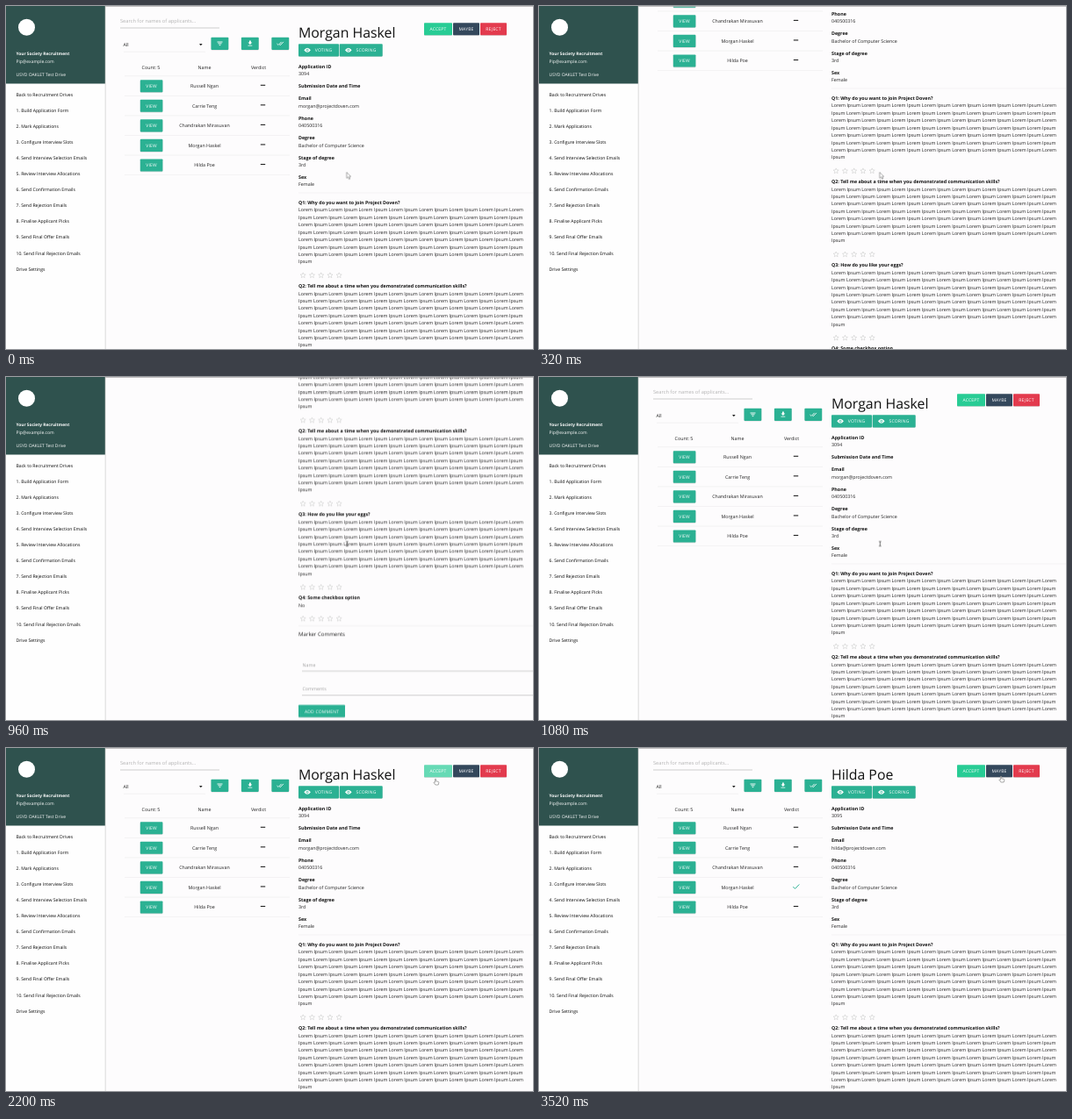
Animation, 600 px wide and 391 px high, one loop 3560 ms. Source, as an HTML page:

```html
<!DOCTYPE html>
<html lang="en">
<head>
<meta charset="utf-8">
<title>Recruitment drive</title>
<style>
  html, body { margin: 0; width: 100%; height: 100%; overflow: hidden; background: #fdfcfd; }
  svg { display: block; width: 600px; height: 391px; }
  text { font: 5.34px "Open Sans", "Noto Sans", sans-serif; fill: #222; text-rendering: geometricPrecision; white-space: pre; }
  .b { font-weight: 700; font-size: 5.34px; fill: #111; }
  .side { font-size: 5.14px; font-weight: 500; fill: #0c0c0c; }
  .head { font-size: 5px; fill: #fff; }
  .bold { font-weight: 700; font-size: 4.8px; }
  .h1 { font-size: 15.85px; fill: #111; }
  .h2 { font-size: 6.1px; }
  .hint { fill: #a3a3a3; }
  .search { font-size: 5.7px; fill: #b4b4b4; }
  .mid { text-anchor: middle; }
  .btn { font-size: 5px; fill: #fff; letter-spacing: .2px; }
  .rule { stroke: #f0eeef; stroke-width: .7; }
  .field { stroke: #b0b0b0; stroke-width: .6; }
  .star { fill: #fff; stroke: #c8c8c8; stroke-width: .55; }
  .icon { fill: none; stroke: #fff; stroke-width: .9; }
  .cur path { fill: #fff; stroke: #666; stroke-width: .55; stroke-linejoin: round; }
</style>
</head>
<body>
<svg id="stage" viewBox="0 0 600 391"></svg>
<script>
const LOOP = 3560, STEP = 40;
const TEAL = '#2bb193', GREEN = '#28cc95', GREEN_HOVER = '#66dab5', NAVY = '#34485c', RED = '#e33b4e';
const BTN_H = 14.1;

// Drawing helpers: y is the middle of the text line
const text = (x, y, s, cls = '') => `<text x="${x}" y="${y + 2}" class="${cls}">${s}</text>`;
const line = (x1, x2, y, cls = 'rule') => `<path d="M${x1} ${y}H${x2}" class="${cls}"/>`;
const box = (x, y, w, fill, id = '') =>
  `<rect x="${x}" y="${y + .7}" width="${w}" height="${BTN_H}" rx="1" fill="#000" opacity=".14"/>` +
  `<rect id="${id}" x="${x}" y="${y}" width="${w}" height="${BTN_H}" rx=".8" fill="${fill}"/>`;
const button = (x, y, w, fill, label, id) =>
  box(x, y, w, fill, id) + text(x + w / 2, y + BTN_H / 2, label, 'btn mid');
const icon = (x, y, d) => `<path class="icon" transform="translate(${x} ${y})" d="${d}"/>`;

const eyeButton = (x, w, label) => box(x, 43.3, w, TEAL) +
  `<path d="M${x + 6.3} 50.3q3.8 -5 7.6 0q-3.8 5 -7.6 0z" fill="#fff"/>` +
  `<circle cx="${x + 10.1}" cy="50.3" r="1.1" fill="#fff" stroke="${TEAL}" stroke-width=".7"/>` +
  text(x + 18.8, 50.3, label, 'btn');

const starPath = Array.from({ length: 10 }, (_, i) => {
  const r = i % 2 ? 1.4 : 3.2, a = i * Math.PI / 5;
  return (r * Math.sin(a)).toFixed(2) + ' ' + (-r * Math.cos(a)).toFixed(2);
}).join('L');
const stars = y => [0, 1, 2, 3, 4].map(i =>
  `<path class="star" transform="translate(${338.2 + i * 10.25} ${y})" d="M${starPath}z"/>`).join('');

// 53 word pairs wrapped at 15 words a line
const words = Array.from({ length: 106 }, (_, i) => i % 2 ? 'Ipsum' : 'Lorem');
function question(y, title) {
  let out = text(333, y, title, 'b');
  for (let i = 0; i < 8; i++)
    out += text(333, y + 8.5 + i * 8.42, words.slice(i * 15, i * 15 + 15).join(' '));
  return out + stars(y + 83.2);
}

const people = ['Russell Ngan', 'Carrie Teng', 'Chandrakan Mirasuvan', 'Morgan Haskel', 'Hilda Poe'];
const dash = y => `<path d="M289.8 ${y}h5.4" stroke="#222" stroke-width="1.1"/>`;

function table() {
  let out = text(165, 70.2, 'Count: 5', 'mid') + text(226, 70.2, 'Name', 'mid') + text(287.5, 70.2, 'Verdict', 'mid');
  out += line(135, 323, 79.7);
  people.forEach((name, i) => {
    const y = 91.2 + i * 22.55;
    out += button(152.8, y - 7, 25.6, TEAL, 'VIEW') + text(226, y, name, 'mid') + line(135, 323, y + 11.2);
    out += i === 3 ? `<g id="undecided">${dash(y - .9)}</g>` : dash(y - .9);
  });
  return out + `<path id="accepted" d="M289.3 158.2l2.2 2.2 4.8-4.9" fill="none" stroke="${TEAL}" stroke-width="1"/>`;
}

const tools = line(130, 243, 25, 'field') + text(130, 16.5, 'Search for names of applicants...', 'search') +
  text(133.5, 44, 'All') + '<path d="M220 43h3.6l-1.8 2.3z" fill="#222"/>' + line(134, 227, 52.3) +
  [233.5, 267.9, 302.4].map(x => box(x, 35.8, 19.8, TEAL)).join('') +
  icon(243.5, 42.8, 'M-3 -1.8H3M-2 0H2M-.8 1.8H.8') +
  '<path d="M277 39.6h1.8v2h1.5l-2.4 2.4-2.4-2.4h1.5zM275.5 44.7h4.8v.9h-4.8z" fill="#fff"/>' +
  icon(312.3, 42.8, 'M-3.8 .2l1.7 1.7M-1.7 .2l1.6 1.7 3.7-3.8M-1 .6l2.3-2.5');

const profile = (id, name, no, mail) => `<g id="${id}">` + text(333, 33.5, name, 'h1') +
  text(333, 77.2, no) + text(333, 113.5, mail) + '</g>';

const details = [
  [69, 'Application ID'], [91.3, 'Submission Date and Time'], [105.3, 'Email'],
  [127.8, 'Phone', '040500316'], [150.3, 'Degree', 'Bachelor of Computer Science'],
  [172.7, 'Stage of degree', '3rd'], [195, 'Sex', 'Female']
].map(([y, label, value]) => text(333, y, label, 'b') + (value ? text(333, y + 8.4, value) : '')).join('');

const page = tools + table() +
  profile('first', people[3], '3094', 'morgan@projectdoven.com') +
  profile('second', people[4], '3095', 'hilda@projectdoven.com') +
  button(476, 19.2, 32, GREEN, 'ACCEPT', 'accept') +
  button(509, 19.2, 30, NAVY, 'MAYBE') +
  button(540, 19.2, 30, RED, 'REJECT') +
  eyeButton(333, 46, 'VOTING') + eyeButton(379.7, 49, 'SCORING') + details + line(333, 600, 213) +
  question(223.9, 'Q1: Why do you want to join Project Doven?') +
  question(319, 'Q2: Tell me about a time when you demonstrated communication skills?') +
  question(414.2, 'Q3: How do you like your eggs?') +
  text(333, 509.2, 'Q4: Some checkbox option', 'b') + text(333, 517.7, 'No') + stars(533.3) +
  line(333, 600, 541.3) + text(333, 551, 'Marker Comments', 'h2') +
  text(337.5, 585.6, 'Name', 'hint') + line(337, 600, 593, 'field') +
  text(337.5, 613, 'Comments', 'hint') + line(337, 600, 620.5, 'field') +
  button(333, 631.5, 53, TEAL, 'ADD COMMENT') +
  button(537.7, 665.4, 65, RED, 'DELETE APPLICATION');

const menu = ['Back to Recruitment Drives', '1. Build Application Form', '2. Mark Applications',
  '3. Configure Interview Slots', '4. Send Interview Selection Emails', '5. Review Interview Allocations',
  '6. Send Confirmation Emails', '7. Send Rejection Emails', '8. Finalise Applicant Picks',
  '9. Send Final Offer Emails', '10. Send Final Rejection Emails', 'Drive Settings'];

const sidebar = '<rect width="113" height="391" fill="#fefefe"/><rect width="113" height="88.5" fill="#2f524e"/>' +
  '<path d="M113.2 0V391" stroke="#d2d2d2" stroke-width=".8"/>' +
  '<circle cx="23.5" cy="24.3" r="9.5" fill="#fff"/>' +
  text(11.5, 54.2, 'Your Society Recruitment', 'head bold') +
  text(11.5, 62.9, 'Pip@example.com', 'head') + text(11.5, 78, 'USYD OAKLET Test Drive', 'head') +
  menu.map((s, i) => text(11.5, 100.7 + i * 18.08, s, 'side')).join('');

const cursor = '<g id="cursor" class="cur">' +
  '<path id="arrow" d="M0 0V6.8L1.6 5.4 2.8 8 3.9 7.5 2.8 5H4.8z"/>' +
  '<g id="beam"><path d="M-.9 -1.9H1.9M.5 -1.9V3.1M-.9 3.1H1.9" style="fill:none;stroke:#444;stroke-width:.7"/></g>' +
  '<g id="hand"><path d="M-.6 .5Q0 -.5 .6 .5V2.9L3.2 3.4Q3.9 3.7 3.8 4.4L3.2 7H-.1L-2 4.4Q-1.9 3.5 -.6 4.3z"/></g></g>';

document.getElementById('stage').innerHTML = `<g id="page">${page}</g>` +
  '<rect x="113" width="487" height=".8" fill="#b2b0b1"/>' + sidebar + cursor;

// Motion: keys are [ms, value]; moves advance every STEP, jumps hold until the next key
function animate(id, prop, keys, jump = false) {
  const all = [...keys, [LOOP, keys[keys.length - 1][1]]];
  const frames = all.map(([ms, value], i) => {
    const next = all[i + 1];
    const n = next && !jump ? Math.max(1, Math.round((next[0] - ms) / STEP)) : 1;
    return { offset: ms / LOOP, [prop]: value, easing: `steps(${n}, end)` };
  });
  document.getElementById(id).animate(frames, { duration: LOOP, iterations: Infinity });
}
const move = (id, keys) => animate(id, 'transform', keys.map(([ms, x, y]) => [ms, `translate(${x}px, ${y}px)`]));
const show = (id, ...keys) => animate(id, 'opacity', keys, true);

move('page', [[0, 0, 0], [200, 0, 0], [240, 0, -18], [280, 0, -58], [320, 0, -119], [360, 0, -220], [400, 0, -302],
  [920, 0, -302], [960, 0, -257.7], [1000, 0, -150], [1040, 0, -50], [1080, 0, 0]]);
move('cursor', [[0, 387.8, 189.5], [1400, 387.8, 189.5], [1560, 412, 150], [1760, 470, 62], [1880, 489, 35],
  [2280, 489, 35], [2520, 556, 34], [2720, 490, 33], [3120, 490, 33], [3320, 552, 32], [3400, 551, 32], [3520, 526, 32]]);

show('arrow', [0, 1], [960, 0], [1400, 1], [1880, 0]);
show('beam', [0, 0], [960, 1], [1400, 0]);
show('hand', [0, 0], [1880, 1]);
animate('accept', 'fill', [[0, GREEN], [1880, GREEN_HOVER], [2360, GREEN], [2680, GREEN_HOVER], [3200, GREEN]], true);

const CLICK = 2960;
for (const id of ['first', 'undecided']) show(id, [0, 1], [CLICK, 0]);
for (const id of ['second', 'accepted']) show(id, [0, 0], [CLICK, 1]);
</script>
</body>
</html>
```
